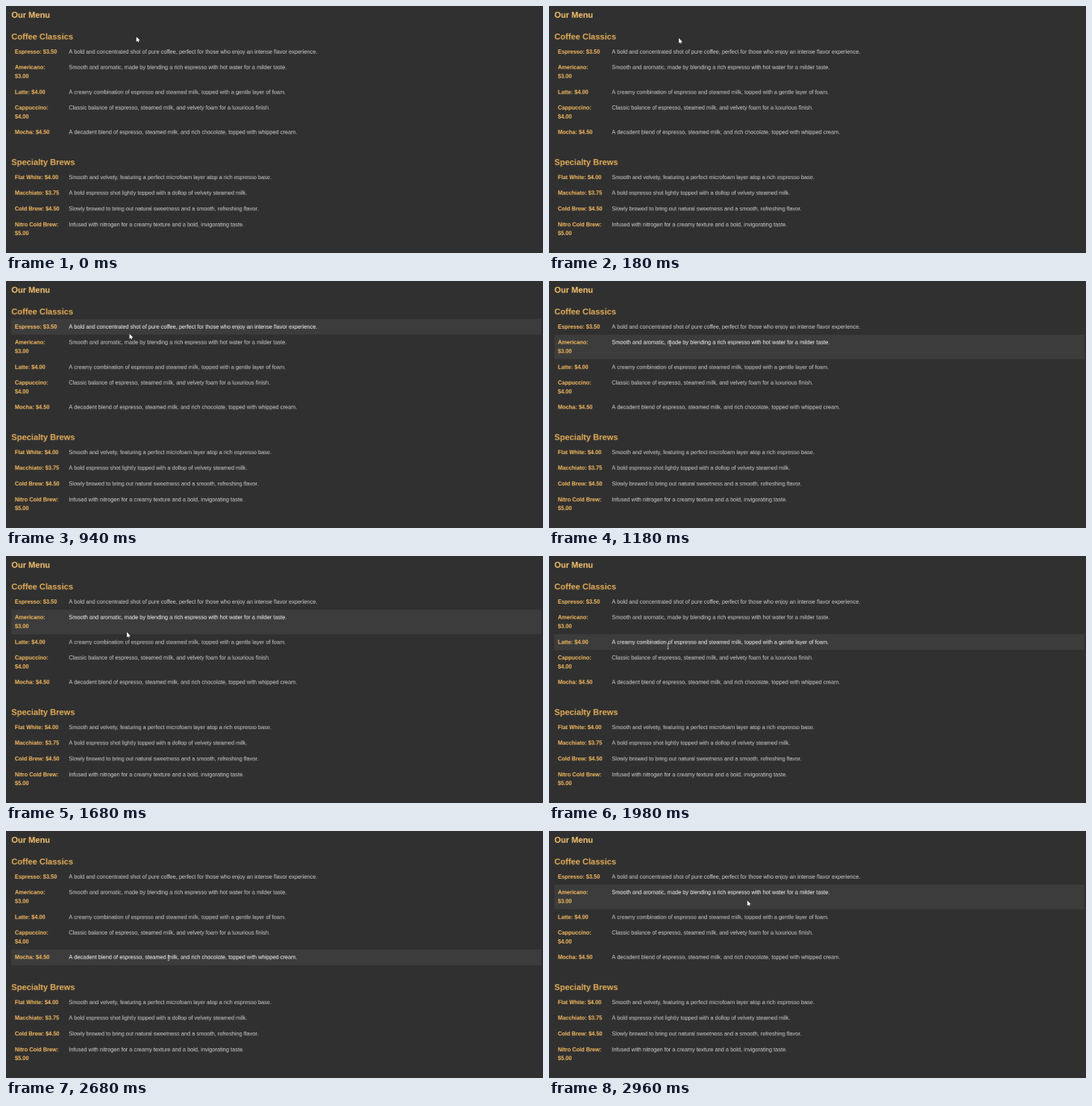
Animation of 720 by 331 pixels, one loop 3 s. Source, as an HTML page with a canvas:

```html
<!DOCTYPE html>
<html lang="en">
<head>
<meta charset="utf-8">
<title>Our Menu</title>
<style>
html, body { margin: 0; width: 100%; height: 100%; overflow: hidden; background: #303030; }
canvas { display: block; }
</style>
</head>
<body>
<canvas id="stage" width="720" height="331"></canvas>
<script>
const LOOP = 3000, SCALE = 0.4625;
const LEFT = 16, PAD = 10, LINE = 25.6, BASE = 27.8, ABOUT_X = 182.4;

// "|" marks a line break in a label
const menu = {
  'Coffee Classics': [
    ['Espresso: $3.50', 'A bold and concentrated shot of pure coffee, perfect for those who enjoy an intense flavor experience.'],
    ['Americano:|$3.00', 'Smooth and aromatic, made by blending a rich espresso with hot water for a milder taste.'],
    ['Latte: $4.00', 'A creamy combination of espresso and steamed milk, topped with a gentle layer of foam.'],
    ['Cappuccino:|$4.00', 'Classic balance of espresso, steamed milk, and velvety foam for a luxurious finish.'],
    ['Mocha: $4.50', 'A decadent blend of espresso, steamed milk, and rich chocolate, topped with whipped cream.']
  ],
  'Specialty Brews': [
    ['Flat White: $4.00', 'Smooth and velvety, featuring a perfect microfoam layer atop a rich espresso base.'],
    ['Macchiato: $3.75', 'A bold espresso shot lightly topped with a dollop of velvety steamed milk.'],
    ['Cold Brew: $4.50', 'Slowly brewed to bring out natural sweetness and a smooth, refreshing flavor.'],
    ['Nitro Cold Brew:|$5.00', 'Infused with nitrogen for a creamy texture and a bold, invigorating taste.']
  ]
};

// Pointer stops on the stage: time, x, y
const stops = [
  [0, 174.8, 41.2], [580, 171, 52], [1180, 162.5, 83.3], [1680, 162, 102],
  [2260, 165, 139.3], [2740, 225, 168], [LOOP, 270, 84]
];
const BEAM_END = 2740;

const stage = document.getElementById('stage').getContext('2d');
stage.imageSmoothingQuality = 'high';

// The page is laid out at full size and shown reduced
const sheet = document.createElement('canvas');
sheet.width = Math.round(720 / SCALE);
sheet.height = Math.round(331 / SCALE);
const page = sheet.getContext('2d');

const arrow = new Path2D('M0 0V6.9L1.7 5.5L2.6 7.4L3.6 7L2.8 5.1H5Z');
const beam = new Path2D('M-1.2 -3.5H1.2M0 -3.5V3.5M-1.2 3.5H1.2');

function write(str, x, y, color, size = 16, weight = 'bold') {
  page.font = `${weight} ${size}px "Liberation Sans", Arial, sans-serif`;
  page.fillStyle = color;
  page.fillText(str, x, y);
}

// Draws the page and tells whether the pointer is over a description
function drawPage(pointerY) {
  page.fillStyle = '#303030';
  page.fillRect(0, 0, sheet.width, sheet.height);
  write('Our Menu', LEFT, 33.5, '#f9c670', 24);
  let y = 97.2, onText = false;
  for (const name in menu) {
    write(name, LEFT, y, '#e6af58', 24);
    y += 12.8;
    for (const [label, about] of menu[name]) {
      const lines = label.split('|');
      const height = lines.length * LINE + 2 * PAD;
      const offset = pointerY - y;
      const hover = offset >= 0 && offset < height;
      if (hover) {
        page.fillStyle = '#3c3c3c';
        page.fillRect(LEFT, y, 1536, height);
        onText = offset > PAD && offset < PAD + LINE;
      }
      lines.forEach((line, i) => write(line, LEFT + PAD, y + BASE + i * LINE, '#fabe62'));
      write(about, ABOUT_X, y + BASE, hover ? '#fff' : '#d2d2d2', 16, 'normal');
      y += height;
    }
    y += 72;
  }
  return onText;
}

// Smooth curve through the stops
function pointer(t) {
  const i = stops.findIndex(s => s[0] > t);
  const a = stops[i - 1], b = stops[i];
  const before = stops[i - 2] || a, after = stops[i + 1] || b;
  const k = (t - a[0]) / (b[0] - a[0]);
  return [1, 2].map(n => {
    const bend = (b[n] - before[n]) / 2 * (1 - k) - (after[n] - a[n]) / 2 * k;
    return a[n] + (b[n] - a[n]) * k * k * (3 - 2 * k) + bend * k * (1 - k);
  });
}

function draw(t) {
  const [x, y] = pointer(t);
  const onText = drawPage(y / SCALE);
  stage.drawImage(sheet, 0, 0, 720, 331);
  stage.save();
  stage.translate(x, y);
  if (onText && t < BEAM_END) {
    stage.strokeStyle = '#e8e8e8';
    stage.lineWidth = 0.6;
    stage.stroke(beam);
  } else {
    stage.strokeStyle = '#222';
    stage.lineWidth = 0.6;
    stage.stroke(arrow);
    stage.fillStyle = '#fff';
    stage.fill(arrow);
  }
  stage.restore();
}

const start = performance.now();
function frame() {
  draw((performance.now() - start) % LOOP);
  requestAnimationFrame(frame);
}
frame();
</script>
</body>
</html>
```
